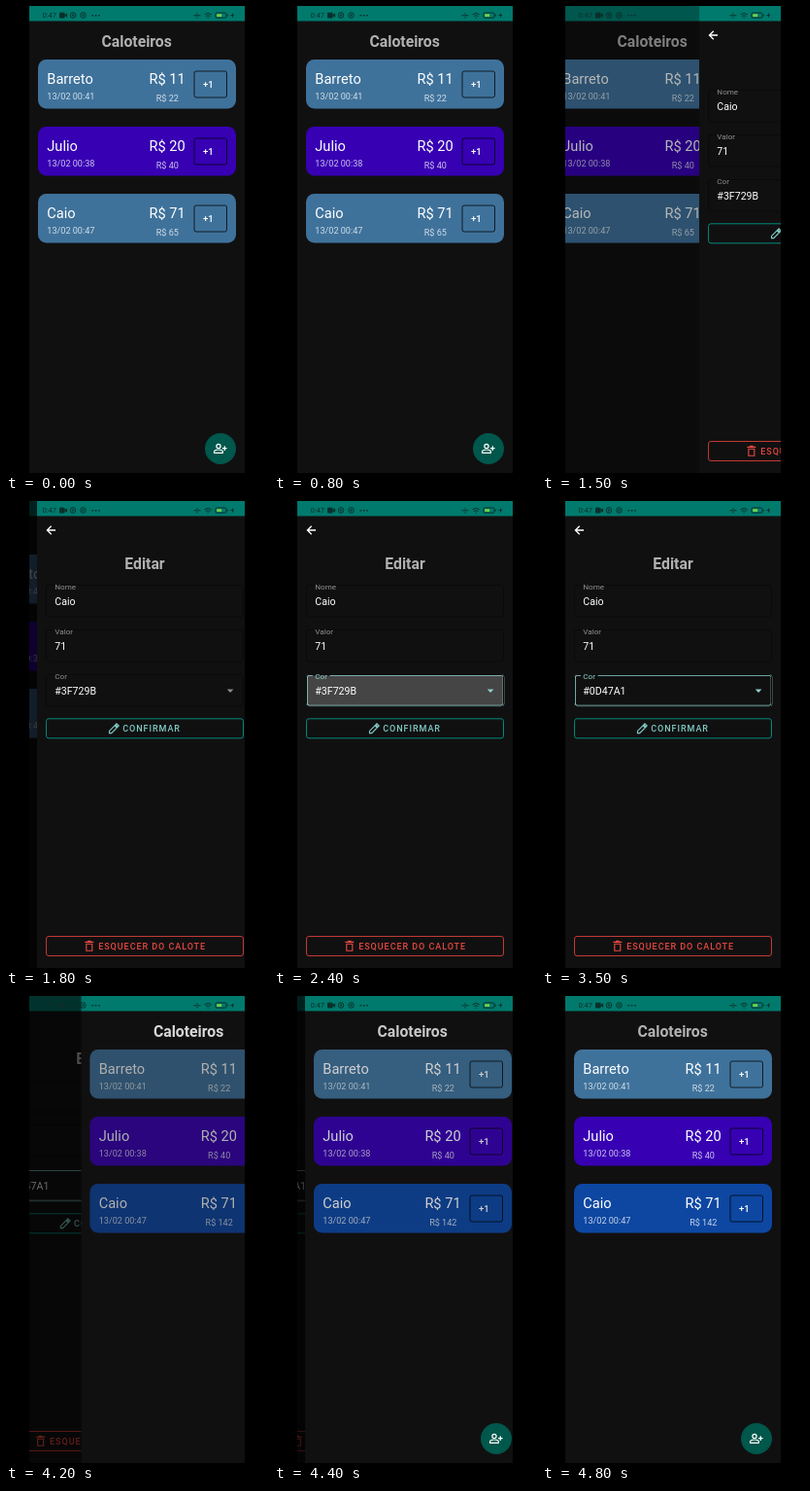
An HTML page that plays this animation: 270 by 480 pixels, repeating every 5400 ms.

```html
<!DOCTYPE html>
<html lang="pt-BR">
<head>
<meta charset="utf-8">
<title>Caloteiros</title>
<style>
  html, body { margin: 0; width: 100%; height: 100%; overflow: hidden; background: #000; }
  svg { display: block; width: 100vw; height: 100vh; font-family: Roboto, Arial, sans-serif; }
  .title { font-size: 15.75px; font-weight: 700; fill: #b2b1b2; text-anchor: middle; }
  .big { font-size: 14.6px; fill: #fff; }
  .small { font-size: 9.1px; fill: #fff; fill-opacity: .76; }
  .mid { text-anchor: middle; }
  .plus { font-size: 9.6px; font-weight: 500; fill: #fff; }
  .label { font-size: 8.1px; fill: #8f8e8f; }
  .value { font-size: 10.6px; fill: #fff; }
  .button { font-size: 9px; font-weight: 500; letter-spacing: .95px; }
  .line { fill: none; stroke-width: 1; }
</style>
</head>
<body>
<svg id="stage" viewBox="0 0 270 480" preserveAspectRatio="none"></svg>
<script>
const W = 222, LEFT = 24, LOOP = 5400, STEP = 100;
const BLUE = '#3F729B', NAVY = '#0D47A1';
const COLORS = ['#CC0000', '#FF8800', '#007E33', '#0099CC', '#00695C',
                NAVY, '#9933CC', BLUE, '#3700B3'];

const text = (x, y, cls, s, extra = '') =>
  `<text x="${x}" y="${y}" class="${cls}" ${extra}>${s}</text>`;
const rect = (x, y, w, h, extra) =>
  `<rect x="${x}" y="${y}" width="${w}" height="${h}" ${extra}/>`;

const backdrop = rect(LEFT, 0, W, 480, 'fill="#111011"') +
                 rect(LEFT, 0, W, 15.5, 'fill="#007a6d"');
const shade = rect(LEFT, 0, W, 480, 'class="shade" opacity="0"');

function card(y, color, name, date, sum, total) {
  return `<g transform="translate(0 ${y})">` +
    rect(33, 0, 204, 50.5, `rx="8.5" fill="${color}"`) +
    text(42.3, 24.6, 'big', name) +
    text(42.3, 41, 'small', date) +
    text(166, 24.6, 'big mid', 'R$ ' + sum) +
    text(166.3, 42.6, 'small mid', 'R$ ' + total) +
    rect(194, 12, 33.5, 27, 'rx="2" class="line" stroke="#000" stroke-opacity=".75"') +
    text(203, 28.6, 'plus', '+1') + '</g>';
}

function list(id, color, total) {
  return `<g id="${id}">${backdrop}` +
    text(134.7, 41.5, 'title', 'Caloteiros') +
    '<g class="cards">' +
    card(55, BLUE, 'Barreto', '13/02 00:41', 11, 22) +
    card(124, '#3700B3', 'Julio', '13/02 00:38', 20, 40) +
    card(193, color, 'Caio', '13/02 00:47', 71, total) + '</g>' +
    '<circle cx="221" cy="455" r="16" fill="#00574b"/>' +
    '<g fill="none" stroke="#fff" stroke-width="1.2">' +
    '<circle cx="219" cy="452.4" r="2.1"/>' +
    '<path d="M214.6 459.4v-1.2c0-1.6 2.6-2.2 4.4-2.2s4.4.6 4.4 2.2v1.2zM223 454.6h4.6M225.3 452.3v4.6"/></g>' +
    `${shade}</g>`;
}

function field(y, name, value, extra = '') {
  return rect(33.5, y + .5, 203, 32.5, 'rx="2.5" class="line" stroke="#0b0a0b"') +
    text(42.3, y + 4.6, 'label', name, extra) +
    text(42.3, y + 21.2, 'value', value, extra && 'id="color"');
}

function button(y, h, line, ink, x, s, icon) {
  return rect(33.5, y, 203, h, `rx="2.5" class="line" stroke="${line}"`) +
    text(x, y + h / 2 + 3.4, 'button', s, `fill="${ink}"`) +
    `<path d="${icon}" fill="none" stroke="${ink}" stroke-width="1.15"/>`;
}

const pencil = 'M98.5 238.6v-2.2l5.6-5.6 2.2 2.2-5.6 5.6zM104.9 230l1.1-1.1 2.2 2.2-1.1 1.1z';
const trash = 'M74.8 455.2h6v7h-6zM73.3 453.4h9M76 452.4h3.6';

const edit = `<g id="edit">${backdrop}` +
  '<path d="M43 30h-8.3M38.7 25.7L34.4 30l4.3 4.3" fill="none" stroke="#fff" stroke-width="1.3"/>' +
  text(135, 70, 'title', 'Editar') +
  field(86, 'Nome', 'Caio') +
  field(132, 'Valor', 71) +
  '<g id="focus">' +
  rect(34, 179, 202.5, 31.5, 'rx="2.5" class="line" stroke="#8ed3cd" style="stroke-width:1.6"') +
  rect(40, 177, 17.5, 4, 'fill="#111011"') + '</g>' +
  rect(34.5, 179.5, 201.5, 30.5, 'id="ripple" rx="2" fill="#fff" opacity="0"') +
  field(178, 'Cor', BLUE, 'id="corLabel"') +
  '<path id="arrow" d="M219.8 193.6h6.6l-3.3 3.3z"/>' +
  rect(34, 224, 202, 20, 'id="press" rx="2" fill="#80cbc4" opacity="0"') +
  button(223.8, 20, '#00897b', '#80cbc4', 112.2, 'CONFIRMAR', pencil) +
  button(447.5, 20, '#c23a32', '#e5493f', 87.2, 'ESQUECER DO CALOTE', trash) +
  '<g id="menu">' + rect(33, 211, 204, 251, 'rx="2" fill="#2a292a"') +
  COLORS.map((c, i) => text(42.3, 228.6 + i * 27.9, 'value', c)).join('') + '</g>' +
  `${shade}</g>`;

const status = '<g fill="none" stroke="#0a2f2a" stroke-width="1">' +
  text(37.5, 12.3, '', '0:47', 'font-size="7.6" fill="#0a2f2a" stroke="none"') +
  '<path d="M55.5 7.2h4.6v4.8h-4.6zM60.6 9.6l2-1.6v3.2z" fill="#0a2f2a"/>' +
  '<circle cx="69" cy="9.5" r="2.8"/><circle cx="69" cy="9.5" r=".8"/>' +
  '<circle cx="79.5" cy="9.5" r="2.8"/><circle cx="79.5" cy="9.5" r=".8"/>' +
  '<path d="M88.5 9.8h8.5" stroke-width="1.6" stroke-dasharray="1.6 1.7"/>' +
  '<path d="M193.5 9.8h7M197 7v1.4M197 11.2v1.4"/>' +
  '<path d="M204.6 8.8q3.6-3 7.2 0M206 10.6q2.2-1.8 4.4 0M207.6 12.2h1.2"/>' +
  '<rect x="216" y="7" width="11" height="5.2" rx="1.2"/>' +
  '<rect x="217.2" y="8.2" width="5" height="2.8" fill="#6fd14a" stroke="none"/>' +
  '<path d="M228.2 8.6v2"/><path d="M231.5 9.6h3.5M233.6 7.6v4"/></g>';

const stage = document.getElementById('stage');
stage.innerHTML = '<clipPath id="screen">' + rect(LEFT, 0, W, 480, '') + '</clipPath>' +
  rect(0, 0, 270, 480, 'fill="#000"') +
  '<g clip-path="url(#screen)">' +
  list('before', BLUE, 65) + edit + list('after', NAVY, 142) + status + '</g>';

const $ = s => stage.querySelector(s);
const set = (s, name, v) => $(s).setAttribute(name, v);
const clamp = v => Math.max(0, Math.min(1, v));
const ramp = (t, a, b) => clamp((t - a) / (b - a));

// Decaying slide: fast start, long settle
function slide(t, start) {
  const d = t - start;
  return d <= 0 ? 0 : d >= 600 ? 1 : 1 - Math.exp(-9.5 * d / 1000);
}

// Each page enters from the right, then drifts left and darkens under the next
function place(id, enter, leave) {
  set(id, 'transform', `translate(${(W * (1 - enter - leave / 4)).toFixed(2)} 0)`);
  set(id, 'visibility', enter > 0 && leave < 1 ? 'visible' : 'hidden');
  set(id + ' .shade', 'opacity', leave * .76);
}

function render(t) {
  const open = slide(t, 1450), close = slide(t, 4050);
  place('#before', 1, open);
  place('#edit', open, close);
  place('#after', close, 0);

  const wake = ramp(t, 4100, 4700);
  set('#after .cards', 'opacity', .6 + .4 * wake);
  const tone = Math.round(222 - 44 * wake);
  $('#after .title').style.fill = `rgb(${tone},${tone},${tone})`;

  const focused = t >= 2300;
  set('#focus', 'opacity', focused ? 1 : 0);
  $('#corLabel').style.fill = focused ? '#8ed3cd' : '';
  set('#arrow', 'fill', focused ? '#8ed3cd' : '#8f8e8f');
  set('#ripple', 'opacity', .22 * ramp(t, 2200, 2400) * (1 - ramp(t, 2400, 2700)));
  set('#menu', 'opacity', ramp(t, 2400, 2700) * (1 - ramp(t, 3200, 3500)));
  $('#color').textContent = t < 3300 ? BLUE : NAVY;
  set('#press', 'opacity', t >= 4000 && t < 4200 ? .12 : 0);
}

let origin;
function tick(now) {
  origin ??= now;
  render(Math.floor((now - origin) % LOOP / STEP) * STEP);
  requestAnimationFrame(tick);
}
render(0);
requestAnimationFrame(tick);
</script>
</body>
</html>
```
